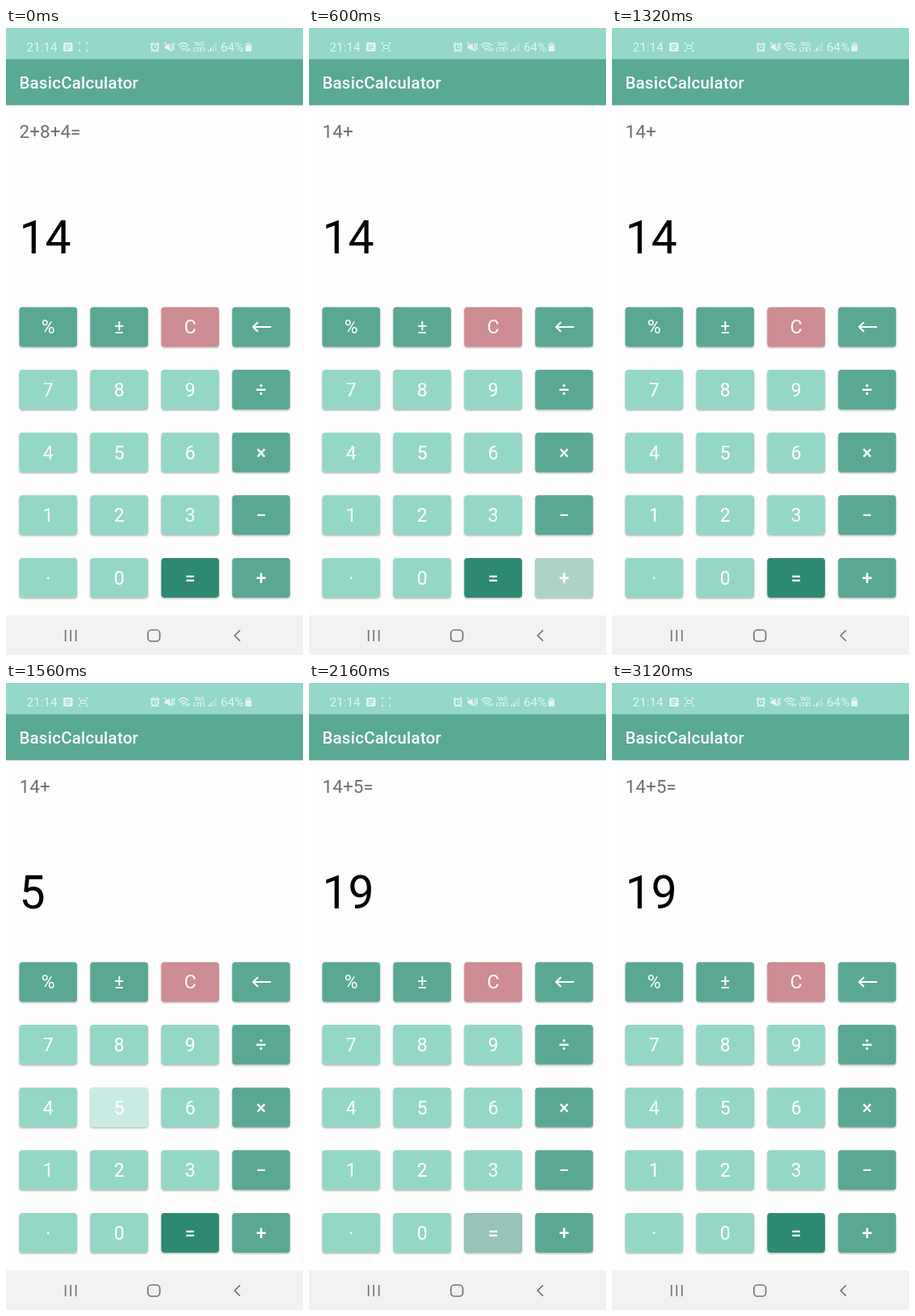
An HTML page that plays this animation: 368 by 776 pixels, repeating every 3480 ms.

```html
<!DOCTYPE html>
<html lang="en">
<head>
<meta charset="utf-8">
<title>BasicCalculator</title>
<style>
  html, body { margin: 0; width: 100%; height: 100%; overflow: hidden; background: #fefefe; }
  svg { display: block; width: 368px; height: 776px; font-family: Roboto, Arial, sans-serif; }
  .key { font-size: 23px; fill: #fff; text-anchor: middle; }
  .strong { font-weight: 500; }
  .line { fill: none; stroke-linecap: round; stroke-linejoin: round; }
</style>
</head>
<body>
<svg viewBox="0 0 368 776" xmlns="http://www.w3.org/2000/svg">
  <defs>
    <filter id="shade" x="-10%" y="-10%" width="120%" height="130%">
      <feGaussianBlur stdDeviation="0.9"/>
    </filter>
  </defs>
  <rect width="368" height="776" fill="#fefefe"/>
  <rect width="368" height="39" fill="#95d7c9"/>
  <rect y="38.6" width="368" height="57" fill="#5aa995"/>

  <!-- status bar -->
  <g fill="#fff" opacity=".74">
    <text x="25.5" y="29" font-size="15.3">21:14</text>
    <path fill-rule="evenodd" d="M72.5 18h8.500q1.500 0 1.500 1.500v8q0 1.500-1.500 1.500h-8.500q-1.500 0-1.500-1.500v-8q0-1.500 1.500-1.500zM73.500 20.500v1.200h6.500v-1.200zM73.500 23v1.200h6.500v-1.200zM73.500 25.500v1.200h4.500v-1.200z"/>
    <path class="line" stroke="#fff" stroke-width="1.100" d="M90.500 20v-1.700h1.700M99 18.300h1.700V20M90.500 26.800v1.700h1.700M99 28.500h1.700v-1.700"/>
    <rect id="rec" x="92.700" y="21.300" width="6" height="4.200" rx=".8" fill="none" stroke="#fff" stroke-width="1.200"/>

    <g class="line" stroke="#fff">
      <circle cx="184.500" cy="23.800" r="4.200" stroke-width="1.900"/>
      <path stroke-width="1.400" d="M179.300 20.300l2.400-2.100M189.700 20.300l-2.400-2.100M181.300 28l-1 1.200M187.700 28l1 1.200"/>
      <path stroke-width="1.100" d="M184.500 21.700v2.300h1.700"/>
      <path stroke-width="1.300" d="M196.500 18l9 10.500M205.500 19.500q1.200 1.200 0 2.400t0 2.400 0 2.400M208 19q1.200 1.300 0 2.600t0 2.600 0 2.600"/>
      <path stroke-width="1.400" d="M213.500 21.300q6.300-5.400 12.600 0M215.500 23.700q4.300-3.600 8.600 0M217.600 26q2.200-1.800 4.300 0"/>
      <path stroke-width="1" d="M224 25.500v3M223 27.500l1 1.100 1-1.100M227 28.500v-3M226 26.500l1-1.100 1 1.100"/>
    </g>
    <path d="M196.500 22h2.300l4-3.300V28.500l-4-3h-2.300zM218.500 27.300h2.500l-1.250 1.700z"/>
    <text x="233.500" y="22" font-size="6.500" font-weight="700">Vo))</text>
    <text x="232" y="29" font-size="7" font-weight="700">LTE1</text>
    <path d="M250 27h1.700v2H250zM253 24.500h1.700V29H253z"/>
    <path opacity=".45" d="M256 21.500h1.700V29H256zM259 18.500h1.700V29H259z"/>
    <text x="266" y="29" font-size="15.300">64%</text>
    <path opacity=".6" d="M299 17.500h3v1.300h1.300q.9 0 .9.900V23h-7.600v-3.300q0-.9.900-.9H299z"/>
    <path d="M296.600 22h7.600v6q0 1-1 1h-5.600q-1 0-1-1z"/>
  </g>

  <text x="16.400" y="75.200" font-size="20.440" font-weight="500" letter-spacing=".255" fill="#fff">BasicCalculator</text>
  <text id="history" x="16.600" y="136" font-size="22.500" fill="#6f6f6f"></text>
  <text id="result" x="16.400" y="278.500" font-size="57.200" fill="#000"></text>
  <g id="keys"></g>

  <!-- navigation bar -->
  <rect y="727" width="368" height="49" fill="#f2f2f2"/>
  <g class="line" stroke="#747474" stroke-width="1.700">
    <path stroke-linecap="butt" d="M73.700 745v14M80.200 745v14M86.700 745v14"/>
    <rect x="175.800" y="745" width="14.800" height="14" rx="4.300"/>
    <path stroke-linecap="butt" d="M290 745.300l-6.800 6.700 6.800 6.700"/>
  </g>
</svg>
<script>
const LOOP = 3480, STEP = 120, BLINK = 460;
const KEY_W = 71.5, KEY_H = 49;
const LIGHT = '#95d7c7', MID = '#5aa894', DARK = '#2e8972', ROSE = '#cd8d92';
const ROWS = ['%±C←', '789÷', '456×', '123−', '·0=+'];
const PRESSES = [
  { key: '+', at: 360, history: '14+', result: '14' },
  { key: '5', at: 1320, history: '14+', result: '5' },
  { key: '=', at: 1920, history: '14+5=', result: '19' }
];
const ripples = {};
const byId = id => document.getElementById(id);

function add(parent, tag, attrs, text) {
  const el = document.createElementNS('http://www.w3.org/2000/svg', tag);
  for (const name in attrs) el.setAttribute(name, attrs[name]);
  if (text) el.textContent = text;
  parent.appendChild(el);
  return el;
}

function keyColor(label) {
  if (label === 'C') return ROSE;
  if (label === '=') return DARK;
  return /[\d·]/.test(label) ? LIGHT : MID;
}

function drawKey(label, col, row) {
  const x = 16.5 + col * 87.95, y = 345.5 + row * 77.6;
  const cx = x + KEY_W / 2, cy = y + KEY_H / 2;
  const box = { x, y, width: KEY_W, height: KEY_H, rx: 3.8 };
  const g = add(byId('keys'), 'g', {});
  add(g, 'rect', { ...box, y: y + 1.3, fill: '#000', opacity: .3, filter: 'url(#shade)' });
  add(g, 'rect', { ...box, fill: keyColor(label) });

  if (PRESSES.some(p => p.key === label)) {
    const id = 'clip' + row + col;
    add(add(g, 'clipPath', { id }), 'rect', box);
    ripples[label] = add(g, 'circle', { cx, cy, r: 0, fill: '#fff', 'clip-path': `url(#${id})` });
  }
  if (label === '←') {
    add(g, 'path', {
      class: 'line', stroke: '#fff', 'stroke-width': 2.2, 'stroke-linecap': 'butt',
      d: `M${cx + 11.5} ${cy}h-21.5m5.500-5.300l-5.500 5.300 5.500 5.300`
    });
    return;
  }
  const strong = '÷×−=+'.includes(label) ? ' strong' : '';
  add(g, 'text', { class: 'key' + strong, x: cx, y: cy + 8.4 }, label);
}

// The ripple spreads over the key, then fades after release.
function setRipple(circle, age) {
  const grow = Math.min(Math.max(age / 220, 0), 1);
  const fade = Math.min(Math.max((480 - age) / 220, 0), 1);
  circle.setAttribute('r', 45 * grow);
  circle.setAttribute('opacity', .5 * Math.min(1, grow * 1.5) * fade);
}

function render(t) {
  let history = '2+8+4=', result = '14';
  for (const p of PRESSES) {
    const age = t - p.at;
    setRipple(ripples[p.key], age);
    if (age >= 240) ({ history, result } = p);
  }
  byId('history').textContent = history;
  byId('result').textContent = result;
  const recOn = t >= 340 && (t - 340) % (2 * BLINK) < BLINK;
  byId('rec').setAttribute('visibility', recOn ? 'visible' : 'hidden');
}

ROWS.forEach((row, y) => [...row].forEach((label, x) => drawKey(label, x, y)));

let start;
function tick(now) {
  start ??= now;
  const t = (now - start) % LOOP;
  render(Math.floor(t / STEP) * STEP);
  requestAnimationFrame(tick);
}
render(0);
requestAnimationFrame(tick);
</script>
</body>
</html>
```
